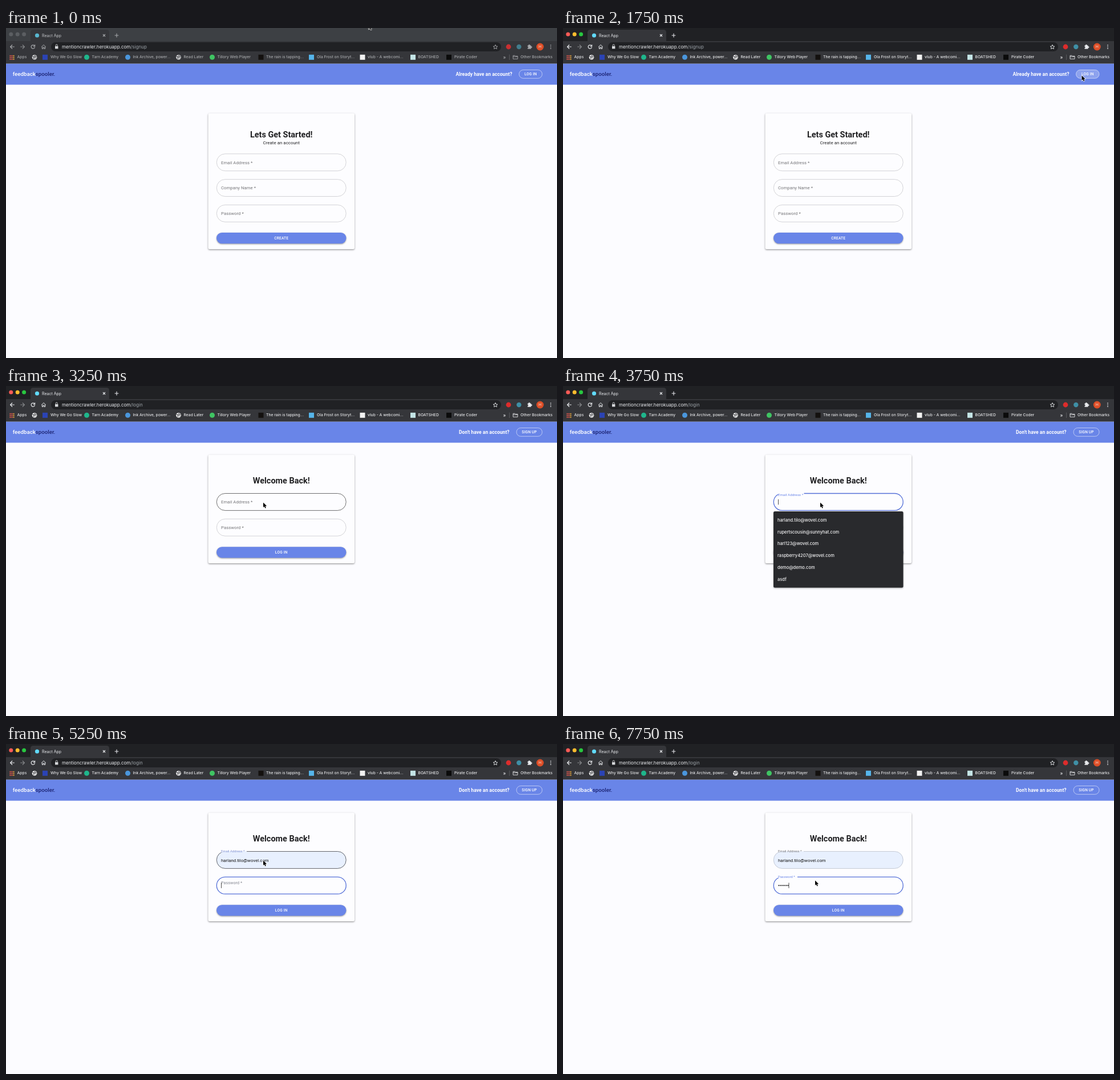
Write an HTML page with a canvas that moves like this. It is 966x579 px and loops after 8 s.

```html
<!DOCTYPE html>
<html lang="en">
<head>
<meta charset="utf-8">
<title>Sign up and log in</title>
<style>
  html, body { margin: 0; width: 100%; height: 100%; overflow: hidden; background: #fcfcff; }
  canvas { display: block; width: 966px; height: 579px; }
</style>
</head>
<body>
<canvas id="stage"></canvas>
<script>
const W = 966, H = 579, LOOP = 8000, STEP = 250;
const canvas = document.getElementById('stage');
const ctx = canvas.getContext('2d');
const dpr = window.devicePixelRatio || 1;
canvas.width = W * dpr;
canvas.height = H * dpr;

const UI = 'Inter, "Open Sans", sans-serif';
const WEB = 'Roboto, Arial, sans-serif';
const BLUE = '#6985e8', FOCUS = '#5570d8', GREY = '#757578', LINE = '#c2c2c6', INK = '#1f1f21';
const FIELD_X = 369, FIELD_W = 227.5, FIELD_H = 30.5;

const EMAIL = 'harland.tilo@wovel.com';
const ALL_EMAILS = [EMAIL, 'rupertscousin@sunnyhat.com', 'harl123@wovel.com',
  'raspberry4207@wovel.com', 'demo@demo.com', 'asdf'];
const MATCHES = [EMAIL, 'harl123@wovel.com', 'Harland.Tilo@wovel.com',
  'harltilo4207@wovel.com', 'harla12nd.tilo@wovel.com', 'harland.tilo'];

// label, text x, icon x, icon shape, icon colour
const BOOKMARKS = [
  ['', 0, 50, 'globe'],
  ['Why We Go Slow', 78, 68.5, 'square', '#2b43b4'],
  ['Tarn Academy', 150.5, 141.5, 'circle', '#1fb68c'],
  ['Ink Archive, power...', 222.5, 213.5, 'circle', '#4a96dc'],
  ['Read Later', 311.5, 302.5, 'globe'],
  ['Tillory Web Player', 370.5, 361.5, 'circle', '#3fc463'],
  ['The rain is tapping...', 456, 447, 'square', '#14110f'],
  ['Ola Frost on Storyt...', 545, 535.5, 'square', '#55b4ea'],
  ['vlub - A webcomi...', 634, 625, 'square', '#f2f2f2'],
  ['BOATSHED', 722.5, 713.5, 'square', '#c4e4e6'],
  ['Pirate Coder', 786, 776.5, 'square', '#0b0b0b']
];

// pointer stops: step, x, y
const POINTER = [
  [0, 636, -6.5], [1, 690, 10], [2, 775, 48], [3, 850, 95], [4, 878, 115.5], [5, 884, 113.5],
  [6, 907, 85], [7, 909.5, 83.5], [11, 800, 113], [12, 530, 186], [13, 451, 204.5],
  [30, 446, 226], [31, 442, 239.5]
];

function text(str, x, cy, size, color, opt = {}) {
  const { font = WEB, weight = 400, align = 'left', spacing = 0 } = opt;
  ctx.font = `${weight} ${size}px ${font}`;
  ctx.letterSpacing = spacing + 'px';
  ctx.textAlign = align;
  ctx.fillStyle = color;
  ctx.fillText(str, x, cy + size * 0.36);
  return ctx.measureText(str).width;
}

function rect(x, y, w, h, color) {
  ctx.fillStyle = color;
  ctx.fillRect(x, y, w, h);
}

function roundPath(x, y, w, h, r) {
  ctx.beginPath();
  ctx.roundRect(x, y, w, h, r);
}

function pill(x, y, w, h, r, color) {
  roundPath(x, y, w, h, r);
  ctx.fillStyle = color;
  ctx.fill();
}

function dot(x, y, r, color) {
  ctx.beginPath();
  ctx.arc(x, y, r, 0, 7);
  ctx.fillStyle = color;
  ctx.fill();
}

function stroke(d, x, y, color, width = 1.1) {
  ctx.save();
  ctx.translate(x, y);
  ctx.strokeStyle = color;
  ctx.lineWidth = width;
  ctx.stroke(new Path2D(d));
  ctx.restore();
}

function shadowed(blur, dy, alpha, draw) {
  ctx.save();
  ctx.shadowColor = `rgba(0,0,0,${alpha})`;
  ctx.shadowBlur = blur * dpr;
  ctx.shadowOffsetY = dy * dpr;
  draw();
  ctx.restore();
}

function globe(x, y, color) {
  dot(x, y, 4.3, color);
  stroke('M-3.6 -1.2 L-1 -.6 L-.4 1 L-2 2.6 M.6 -3.4 L.4 -1.6 L3.4 -1 M1.2 1 L2.8 1.2', x, y, '#35363a', 1.2);
}

function bookmarksBar(active) {
  const color = active ? '#e4e5e7' : '#a6a8ab';
  const opt = { font: UI, weight: 500 };
  const palette = ['#e2574c', '#e2574c', '#e8a33d'];
  for (let i = 0; i < 9; i++) {
    rect(6.5 + (i % 3) * 3, 47.8 + Math.floor(i / 3) * 3, 2, 2, palette[i % 3]);
  }
  text('Apps', 19.5, 51, 6.75, color, opt);
  for (const [label, tx, ix, shape, fill] of BOOKMARKS) {
    if (shape === 'globe') globe(ix, 51.2, active ? '#f1f1f2' : '#d5d6d8');
    else if (shape === 'circle') dot(ix, 51.2, 4.5, fill);
    else rect(ix - 4.5, 46.8, 9, 9, fill);
    if (label) text(label, tx, 51, 6.75, color, opt);
  }
  text('»', 871.5, 51, 8, color, opt);
  rect(882, 46.5, 0.7, 9.5, '#66686c');
  stroke('M-4 3 V-3 H-.8 L.2 -2 H4 V3 Z M-4 -1 H4', 893, 51.3, color, 0.9);
  text('Other Bookmarks', 902, 51, 6.75, color, opt);
}

function browser(active, path) {
  rect(0, 0, W, 24, active ? '#202124' : '#3d4044');
  rect(0, 23, W, 39.5, '#35363a');
  pill(43, 3, 138, 24, 4.5, '#35363a');
  ['#fc5b57', '#fdbc2e', '#28c840'].forEach((c, i) => dot(8.8 + i * 11.4, 11, 3.5, active ? c : '#5b5e62'));

  const bright = active ? '#e8eaed' : '#a6a8ab';
  dot(54.5, 13, 3.6, active ? '#61dafb' : '#58b7d0');
  text('React App', 63, 13, 7, active ? '#e8eaed' : '#c3c5c8', { font: UI });
  stroke('M-2 -2 L2 2 M2 -2 L-2 2', 172, 13, bright);
  stroke('M-3.4 0 H3.4 M0 -3.4 V3.4', 194, 13, bright);

  stroke('M3.8 0 H-3.4 M.1 -3.5 L-3.4 0 L.1 3.5', 11, 33, bright, 1.2);
  stroke('M-3.8 0 H3.4 M-.1 -3.5 L3.4 0 L-.1 3.5', 29, 33, '#85878a', 1.2);
  stroke('M2.4 -2.2 A3.2 3.2 0 1 0 3.2 .6 M3.3 -3.8 V-.9 H.4', 47.3, 33, bright, 1.2);
  stroke('M-3.8 .2 L0 -3.5 L3.8 .2 M-2.7 -.4 V3.4 H-.9 V.9 H.9 V3.4 H2.7 V-.4', 66, 33, bright, 1);

  pill(79, 25, 789, 16, 8, '#202124');
  rect(86, 32, 5.4, 4.4, '#d5d7da');
  stroke('M-1.5 0 V-1.7 A1.5 1.5 0 0 1 1.5 -1.7 V0', 88.7, 32, '#d5d7da', 0.9);
  const host = text('mentioncrawler.herokuapp.com', 98, 33, 8.05, '#e8eaed', { font: UI });
  text(path, 98 + host, 33, 8.05, '#9aa0a6', { font: UI });

  stroke('M0 -3.8 L1.1 -1.2 L3.8 -1 L1.8 .8 L2.4 3.5 L0 2.1 L-2.4 3.5 L-1.8 .8 L-3.8 -1 L-1.1 -1.2 Z', 858, 33.2, bright, 0.9);
  dot(881, 33, 4.4, active ? '#dd2c2c' : '#c92f31');
  dot(899.3, 33, 4.2, active ? '#3f8fa5' : '#427c8c');
  rect(914.5, 30.5, 6, 6.2, bright);
  dot(917.4, 30.3, 1.4, bright);
  dot(921, 33.6, 1.4, bright);
  dot(914.6, 33.8, 1.1, '#35363a');
  dot(936.3, 33, 6.4, '#dd4e27');
  text('H', 936.3, 33, 6.8, '#f7e5df', { font: UI, align: 'center' });
  for (let i = -1; i < 2; i++) dot(955, 33 + i * 2.9, 0.85, bright);
  bookmarksBar(active);
}

function header(question, qx, label, bx, hover) {
  rect(0, 62.5, W, 37, BLUE);
  const logo = { weight: 500 };
  const w = text('feedback', 11.8, 81, 9.7, '#ffffff', logo);
  text('spooler.', 11.8 + w, 81, 9.7, '#1c2474', logo);
  text(question, qx, 81, 8.6, '#ffffff', { weight: 700 });
  roundPath(bx, 73.5, 940 - bx, 14.8, 7.4);
  ctx.fillStyle = `rgba(255,255,255,${hover})`;
  ctx.fill();
  ctx.strokeStyle = 'rgba(255,255,255,.75)';
  ctx.lineWidth = 0.7;
  ctx.stroke();
  text(label, (bx + 940) / 2, 81, 6.6, '#ffffff', { weight: 500, align: 'center', spacing: 0.18 });
}

function card(y, h, title, titleY) {
  shadowed(3, 1.2, 0.42, () => pill(354.5, y, 256.5, h, 2.5, '#fdfdff'));
  text(title, 482.7, titleY, 14.45, INK, { weight: 700, align: 'center' });
}

function submit(y, label) {
  shadowed(2.5, 1, 0.4, () => pill(FIELD_X, y, FIELD_W, 19.2, 9.6, BLUE));
  text(label, 482.7, y + 9.6, 6.6, '#ffffff', { weight: 500, align: 'center', spacing: 0.18 });
}

// lift: 0 = label resting inside, 1 = label small on the border
function field(y, label, o = {}) {
  const { lift = 0, notch = 0, border = LINE, width = 0.7, fill, color = GREY } = o;
  if (fill) pill(FIELD_X, y, FIELD_W, FIELD_H, 15, fill);
  ctx.save();
  if (notch) {
    ctx.beginPath();
    ctx.rect(0, 0, W, H);
    ctx.rect(375, y - 2, notch, 4);
    ctx.clip('evenodd');
  }
  roundPath(FIELD_X + 0.3, y + 0.3, FIELD_W - 0.6, FIELD_H - 0.6, 14.8);
  ctx.strokeStyle = border;
  ctx.lineWidth = width;
  ctx.stroke();
  ctx.restore();
  text(label, 377, y + 15.3 - 15.8 * lift, 7.7 * (1 - 0.25 * lift), color, { spacing: 0.07 * (1 - 0.25 * lift) });
}

const caret = (x, cy) => rect(x, cy - 4.7, 0.8, 9.4, '#222');

function dropdown(items, selected) {
  shadowed(3, 1, 0.35, () => pill(FIELD_X, 220, FIELD_W, 133.8, 2.5, '#292a2d'));
  if (selected) rect(FIELD_X, 224.6, FIELD_W, 20.8, '#4b4c4f');
  items.forEach((s, i) => text(s, 376, 235.2 + i * 20.75, 7.5, '#f4f4f5', { font: UI, weight: 500 }));
}

function signupPage(step) {
  header('Already have an account?', 788.5, 'LOG IN', 899.5, step < 6 ? 0 : step === 6 ? 0.12 : 0.24);
  card(149.5, 238.5, 'Lets Get Started!', 186.8);
  text('Create an account', 482.7, 201, 7.8, INK, { align: 'center', spacing: 0.07 });
  ['Email Address *', 'Company Name *', 'Password *'].forEach((s, i) => field(220.5 + i * 44.8, s));
  submit(359, 'CREATE');
}

function emailField(step) {
  const y = 188.2, label = 'Email Address *';
  const focus = { border: FOCUS, width: 1.3, color: BLUE, notch: 47.5, lift: step === 15 ? 0.79 : 1 };
  if (step < 15) return field(y, label, { border: step >= 13 ? '#333' : LINE });
  if (step < 20) {
    field(y, label, focus);
    const typed = step < 17 ? '' : step === 17 ? 'h' : 'ha';
    const w = typed ? text(typed, 377, 204, 7.8, '#111') : 0;
    return caret(377 + w, 203.5);
  }
  const fill = '#e8f0fe';
  if (step === 20) {
    field(y, label, { ...focus, fill });
    return text(EMAIL, 377, 204, 7.35, '#111', { font: UI });
  }
  field(y, label, {
    lift: 1, notch: 47, fill,
    border: step < 30 ? '#2b2b2e' : '#b7bac4',
    color: step === 21 ? '#7f90cf' : GREY
  });
  text(EMAIL, 377, 204, 7.8, '#111', { spacing: 0.02 });
}

function passwordField(step) {
  const y = 233, label = 'Password *';
  if (step < 21) return field(y, label);
  const first = step === 21;
  field(y, label, {
    border: FOCUS, width: 1.3,
    lift: first ? 0.28 : 1,
    notch: first ? 0 : 36,
    color: first ? '#83868f' : BLUE
  });
  const typed = step < 25 ? 0 : Math.min(7, Math.round((step - 24) * 1.2));
  for (let i = 0; i < typed; i++) dot(378.3 + i * 2.7, 248.2, 0.95, '#111');
  if (step < 23 || typed) caret(377 + typed * 2.65, 248.2);
}

function loginPage(step) {
  header("Don't have an account?", 794, 'SIGN UP', 895, step === 10 ? 0.26 : 0);
  card(120.5, 190.5, 'Welcome Back!', 166);
  emailField(step);
  passwordField(step);
  submit(282.2, 'LOG IN');
  if (step >= 15 && step <= 20) dropdown(step < 17 ? ALL_EMAILS : MATCHES, step === 20);
}

function pointer(step) {
  const [, x, y] = POINTER.filter(p => p[0] <= step).pop();
  const arrow = new Path2D('M0 0 V8.6 L2 6.8 L3.3 9.9 L4.8 9.3 L3.5 6.3 L6.1 6.1 Z');
  ctx.save();
  ctx.translate(x, y);
  ctx.strokeStyle = '#fff';
  ctx.lineWidth = 1.2;
  ctx.stroke(arrow);
  ctx.fillStyle = '#000';
  ctx.fill(arrow);
  ctx.restore();
}

function draw(now) {
  const step = Math.floor((now % LOOP) / STEP);
  const signup = step < 10;
  ctx.setTransform(dpr, 0, 0, dpr, 0, 0);
  rect(0, 0, W, H, '#fcfcff');
  (signup ? signupPage : loginPage)(step);
  browser(step >= 3, signup ? '/signup' : '/login');
  pointer(step);
}

function frame() {
  draw(performance.now());
  requestAnimationFrame(frame);
}
frame();
</script>
</body>
</html>
```
